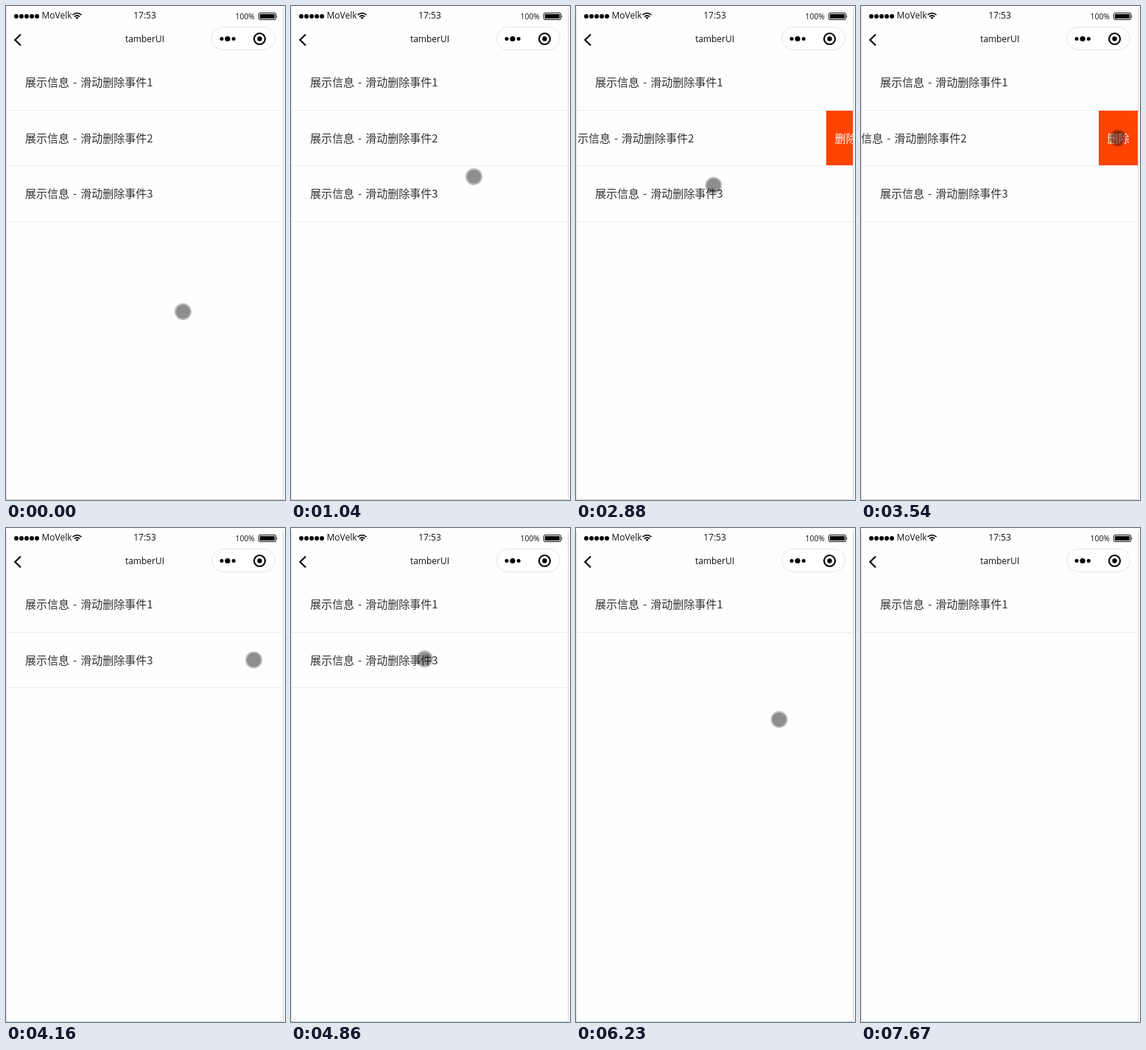
An HTML page that plays this animation: 379 by 670 pixels, repeating every 8.77 s.

```html
<!DOCTYPE html>
<html lang="zh-CN">
<head>
<meta charset="utf-8">
<title>滑动删除</title>
<style>
  html, body { margin: 0; width: 100%; height: 100%; overflow: hidden; background: #fff; }
  svg { display: block; width: 100%; height: 100%; }
  .ui { font-family: "Open Sans", "Noto Sans", sans-serif; font-size: 12px; fill: #111; }
  .small { font-size: 10.4px; }
  .mid { text-anchor: middle; }
  .cjk { font-family: "Noto Sans CJK SC", "Noto Sans CJK", sans-serif; font-size: 15px; fill: #333; word-spacing: 1.6px; }
  .button { fill: #fff; }
</style>
</head>
<body>
<svg viewBox="0 0 379 670" preserveAspectRatio="xMinYMin meet">
  <defs>
    <clipPath id="screen"><rect x="1" width="375" height="669"/></clipPath>
  </defs>
  <rect width="379" height="670" fill="#fff"/>
  <rect x="1" width="375" height="669" fill="#fefefe"/>
  <path d="M.5 4V669" stroke="#e2e2e2"/>
  <path d="M376.5 4V669" stroke="#dedede"/>
  <path d="M377.5 4V669" stroke="#f0f0f0"/>
  <path d="M0 669.5H377" stroke="#d2d2d2"/>

  <path d="M14 14h28.1" stroke="#000" stroke-width="6" stroke-linecap="round" stroke-dasharray="0 7"/>
  <text class="ui" x="48.5" y="17">MoVelk</text>
  <path d="M90.5 12.2Q96.5 7.2 102.5 12.2M92.8 14.6Q96.5 11.4 100.2 14.6" fill="none" stroke="#111" stroke-width="1.7"/>
  <path d="M94.4 15.9Q96.5 14.2 98.6 15.9L96.5 18Z" fill="#111"/>
  <text class="ui mid" x="188.5" y="17">17:53</text>
  <text class="ui small" x="311.5" y="18">100%</text>
  <rect x="343.5" y="9.5" width="23" height="9" rx="1.5" fill="none" stroke="#111"/>
  <rect x="345" y="11" width="20" height="6"/>
  <path d="M367.5 12.2Q369.4 14 367.5 15.8Z" fill="#111"/>

  <path d="M20 38.5L12.3 46L20 53.5" fill="none" stroke="#111" stroke-width="2.3"/>
  <text class="ui mid" x="188.5" y="49">tamberUI</text>
  <rect x="279.5" y="28.5" width="86" height="31" rx="15.5" fill="#fff" stroke="#e6e6e6"/>
  <circle cx="293" cy="44.5" r="2.5"/>
  <circle cx="301" cy="44.5" r="3.6"/>
  <circle cx="309.2" cy="44.5" r="2.5"/>
  <circle cx="344.5" cy="44.5" r="7.5" fill="none" stroke="#000" stroke-width="2.1"/>
  <circle cx="344.5" cy="44.5" r="3.2"/>

  <g id="list" clip-path="url(#screen)"></g>
  <g id="pointer">
    <circle r="10.5" fill="none" stroke="#000" stroke-opacity=".25" stroke-width="2"/>
    <circle r="9.6" fill-opacity=".44"/>
  </g>
</svg>
<script>
const LOOP = 8770, REFRESH = 130, HIDE = 7670;
const SLIDE = 400, SHIFT = 56, ROW_TOP = 66, ROW_HEIGHT = 75.5;

const rows = [
  { open: Infinity, gone: Infinity },
  { open: 2680, gone: 4010 },
  { open: 4870, gone: 5700 }
];

// Pointer stops between which the hand moves
const stops = [
  { t: 650, x: 240.5, y: 414.5 },
  { t: 1040, x: 248.5, y: 231.5 },
  { t: 1690, x: 280.5, y: 112 },
  { t: 1950, x: 280.5, y: 112 },
  { t: 2340, x: 289.5, y: 181.5 },
  { t: 2990, x: 175, y: 250.5 },
  { t: 3510, x: 349, y: 179 },
  { t: 4030, x: 349, y: 179 },
  { t: 4810, x: 181.5, y: 177.5 },
  { t: 5330, x: 338, y: 193 },
  { t: 5720, x: 349, y: 180 },
  { t: 6240, x: 262.5, y: 274.5 },
  { t: 6970, x: 262.5, y: 274.5 },
  { t: 7540, x: 335.5, y: 625.5 }
];

const byId = id => document.getElementById(id);
const clamp = v => Math.min(1, Math.max(0, v));
const mix = (a, b, p) => a + (b - a) * p;
const easeOut = p => 1 - (1 - p) ** 2;
const easeInOut = p => p * p * (3 - 2 * p);
const move = (el, x, y) => el.setAttribute("transform", `translate(${x} ${y})`);
const show = (el, on) => { el.style.display = on ? "" : "none"; };

byId("list").innerHTML = rows.map((_, i) => `
  <g>
    <g class="cjk">
      <text x="26" y="43">展示信息 - 滑动删除事件${i + 1}</text>
      <rect x="379" width="53" height="75" fill="#ff4400"/>
      <text class="button mid" x="405.5" y="43">删除</text>
    </g>
    <path d="M1 .5H376" stroke="#ececec"/>
  </g>`).join("");

rows.forEach((row, i) => {
  row.el = byId("list").children[i];
  [row.body, row.line] = row.el.children;
});

function pointerAt(t) {
  const next = stops.findIndex(s => s.t > t);
  if (next < 1) return next ? stops[stops.length - 1] : stops[0];
  const a = stops[next - 1], b = stops[next];
  const p = easeInOut((t - a.t) / (b.t - a.t));
  return { x: mix(a.x, b.x, p), y: mix(a.y, b.y, p) };
}

function draw(time) {
  const t = Math.floor(time / REFRESH) * REFRESH;
  let top = ROW_TOP;
  for (const row of rows) {
    const alive = time < row.gone;
    show(row.el, alive);
    if (!alive) continue;
    const y = Math.round(top);
    top += ROW_HEIGHT;
    move(row.body, -SHIFT * easeOut(clamp((t - row.open) / SLIDE)), y);
    move(row.line, 0, Math.floor(top - .25));
  }
  const { x, y } = pointerAt(t);
  move(byId("pointer"), x, y);
  show(byId("pointer"), time < HIDE);
}

const begin = performance.now();
function loop() {
  draw((performance.now() - begin) % LOOP);
  requestAnimationFrame(loop);
}
loop();
</script>
</body>
</html>
```
